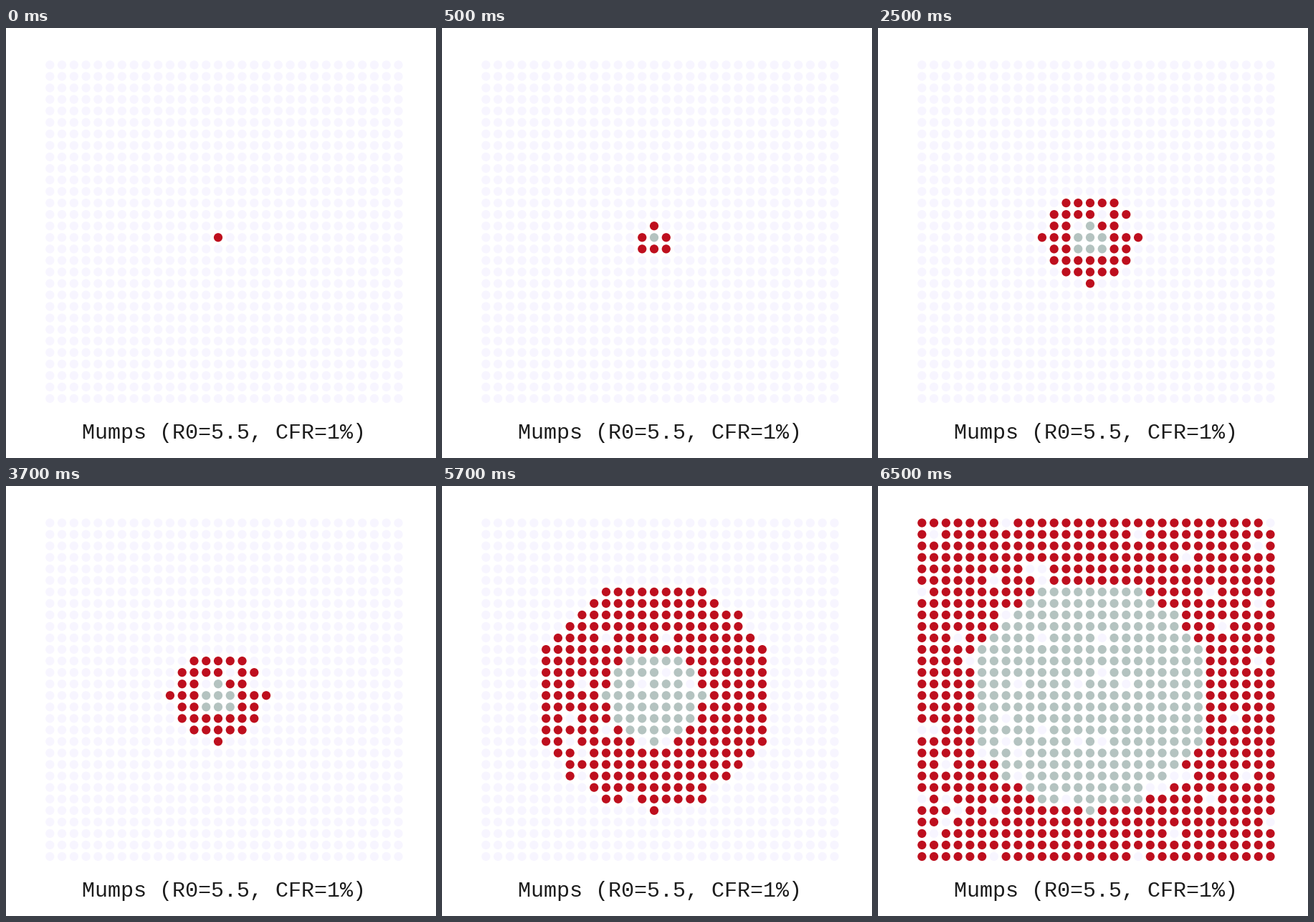
Animation, 600 px wide and 600 px high, one loop 8000 ms. Source, as a matplotlib script:

```python
import matplotlib.pyplot as plt
import numpy as np
from matplotlib.animation import FuncAnimation
from matplotlib.collections import EllipseCollection

SIZE, DPI, N = 600, 100, 30
STEP_MS, LOOP_MS = 500, 8000
FIRST_MS, WAVE_MS = 500, 2000
HEALTHY, SICK, RECOVERED = "#f7f5ff", "#be0f1e", "#b4c3c0"
ORIGIN = (13.995, 15.04)             # slightly off the first case, to break ties
REACH = (0.1, 2, 16.2, 99.25)        # squared radius infected by each wave
INNER_GAPS = ((13, 14), (15, 13), (17, 14))
IMMUNE_RATE = 0.046
NEVER = 9


def infection_waves():
    """Wave in which each person falls ill: growing discs with immune gaps."""
    row, col = np.mgrid[:N, :N]
    dist2 = (col - ORIGIN[0]) ** 2 + (row - ORIGIN[1]) ** 2
    wave = np.searchsorted(REACH, dist2)
    immune = np.random.default_rng(5).random((N, N)) < IMMUNE_RATE
    wave[immune & (wave > 2)] = NEVER
    for c, r in INNER_GAPS:
        wave[r, c] = NEVER
    return wave.ravel()


waves = infection_waves()
xs, ys = np.meshgrid(np.linspace(61.3, 547.5, N), np.linspace(51.5, 517, N))

fig = plt.figure(figsize=(SIZE / DPI, SIZE / DPI), dpi=DPI, facecolor="white")
ax = fig.add_axes([0, 0, 1, 1])
ax.set(xlim=(0, SIZE), ylim=(SIZE, 0))
ax.axis("off")

diameter = np.full(N * N, 12.2)
dots = EllipseCollection(diameter, diameter, np.zeros(N * N), units="xy",
                         offsets=np.column_stack([xs.ravel(), ys.ravel()]),
                         offset_transform=ax.transData, linewidths=0)
ax.add_collection(dots)
ax.text(105.5, 573, "Mumps (R0=5.5, CFR=1%)", family="Liberation Mono",
        fontsize=30 * 72 / DPI, color="#1c1c1c", va="baseline")


def update(frame):
    now = (frame * STEP_MS - FIRST_MS) // WAVE_MS + 1
    dots.set_facecolor(np.where(waves > now, HEALTHY,
                                np.where(waves == now, SICK, RECOVERED)))
    return (dots,)


anim = FuncAnimation(fig, update, frames=LOOP_MS // STEP_MS,
                     interval=STEP_MS, repeat=True, repeat_delay=0)
plt.show()
```
